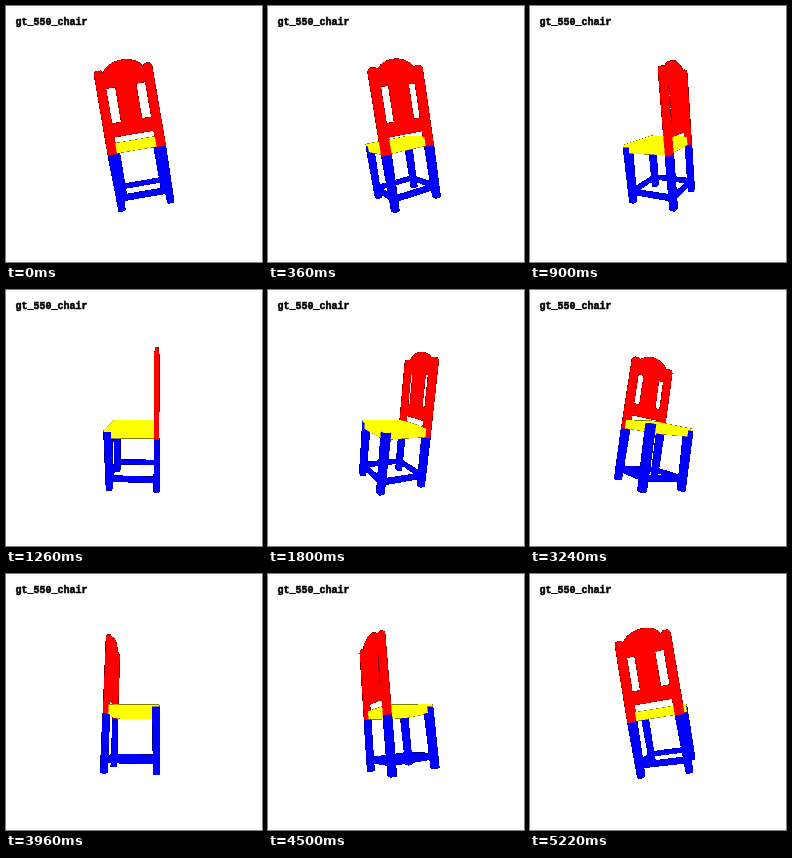
Write an HTML page with a canvas that moves like this. It is 256 by 256 pixels and loops after 5400 ms.

```html
<!DOCTYPE html>
<html lang="en">
<head>
<meta charset="utf-8">
<title>Turning chair</title>
<style>
html, body { margin: 0; width: 100%; height: 100%; overflow: hidden; background: #fff; }
canvas { display: block; width: 256px; height: 256px; image-rendering: pixelated; }
</style>
</head>
<body>
<canvas id="stage" width="256" height="256"></canvas>
<script>
const SIZE = 256, SUB = 2, GRID = SIZE * SUB;
const STEP = 180, STEPS = 30;
const FOV = Math.PI / 3;
const CAMERA = SIZE / 2 / Math.tan(FOV / 2);
const TILT = 0.17;
const RED = 1, YELLOW = 2, BLUE = 3;
const RGB = [[0, 0, 0], [255, 0, 0], [255, 255, 0], [0, 0, 255]];

// Chair measures: x to the side, y up, z towards the back rest.
const FLOOR = -65.8, SEAT_LOW = -14.6, SEAT_TOP = -6.4;
const LEG_X = 22.1, LEG_Z = 22.6;
const SLOT_IN = 9.5, SLOT_OUT = 18, POST_OUT = 26.2;
const RAIL_LOW = 0, RAIL_TOP = 12.6, SLOT_TOP = 44.6, SHOULDER = 58, ARCH = 9.3;

const ctx = document.getElementById("stage").getContext("2d");
const depth = new Float32Array(GRID * GRID);
const paint = new Uint8Array(GRID * GRID);
const solids = [];

// A level rectangle around (x, z) with width w and depth d.
function plate(x, z, w, d, y) {
  return [[-1, -1], [1, -1], [1, 1], [-1, 1]]
    .map(([i, j]) => [x + i * w / 2, y, z + j * d / 2]);
}

function solid(color, low, high) {
  solids.push({ color, corners: [...low, ...high] });
}

function box(color, x, z, w, d, y0, y1) {
  solid(color, plate(x, z, w, d, y0), plate(x, z, w, d, y1));
}

function buildChair() {
  const postX = (SLOT_OUT + POST_OUT) / 2, postW = POST_OUT - SLOT_OUT;
  const legTop = SEAT_TOP - 2.2, joint = SEAT_LOW - 0.4;
  const barLow = -57.3, barTop = -52.3, thick = 3;

  for (const s of [-1, 1]) {
    const foot = z => plate(s * LEG_X, z, 5.8, 5.6, FLOOR);
    solid(BLUE, foot(-LEG_Z), plate(s * 22.4, -21.9, 6.8, 6.8, legTop));
    solid(BLUE, foot(LEG_Z), plate(s * postX, LEG_Z, postW, 4.8, joint));
    box(RED, s * postX, LEG_Z, postW, 4.5, joint, SHOULDER);
    solid(RED, plate(s * postX, LEG_Z, postW, 4.5, SHOULDER),
      plate(s * postX, LEG_Z, postW * 0.65, 4, SHOULDER + 2.6));
    box(BLUE, s * LEG_X, 0, thick, 2 * LEG_Z, barLow, barTop);
    box(BLUE, 0, s * LEG_Z, 2 * LEG_X, thick, barLow, barTop);
  }

  // the seat narrows towards the back
  const seat = y => plate(0, -1, 51, 48.4, y)
    .map(([x, h, z]) => [z > 0 ? x * 0.95 : x, h, z]);
  solid(YELLOW, seat(SEAT_LOW), seat(SEAT_TOP));

  const panel = (w, y0, y1) => box(RED, 0, LEG_Z, w, thick, y0, y1);
  const span = 2 * SLOT_OUT + 0.8;
  panel(span, RAIL_LOW, RAIL_TOP);
  panel(2 * SLOT_IN, RAIL_TOP - 1, SLOT_TOP + 1);

  const parts = 16, w = span / parts;
  const arch = x => SHOULDER + ARCH * Math.pow(Math.max(0, 1 - (2 * x / span) ** 2), 0.65);
  for (let i = 0; i < parts; i++) {
    const x = (i + 0.5) * w - span / 2;
    const low = plate(x, LEG_Z, w, thick, SLOT_TOP);
    solid(RED, low, low.map(([px, , pz]) => [px, arch(px), pz]));
  }
}

// Lean the chair sideways, turn it about the upright axis, then view it in perspective.
function project([x, y, z], angle) {
  const wx = x * Math.cos(TILT) - y * Math.sin(TILT);
  const wy = x * Math.sin(TILT) + y * Math.cos(TILT);
  const c = Math.cos(angle), s = Math.sin(angle);
  const f = CAMERA / (CAMERA - (z * c - wx * s));
  const mid = SIZE / 2;
  return [(mid + f * (wx * c + z * s)) * SUB, (mid - f * wy) * SUB, f];
}

function cross(a, b, x, y) {
  return (a[0] - x) * (b[1] - y) - (a[1] - y) * (b[0] - x);
}

function triangle(a, b, c, color) {
  const area = cross(b, c, a[0], a[1]);
  if (Math.abs(area) < 1e-6) return;
  const low = i => Math.max(0, Math.floor(Math.min(a[i], b[i], c[i])));
  const high = i => Math.min(GRID - 1, Math.ceil(Math.max(a[i], b[i], c[i])));
  const xStart = low(0), xEnd = high(0), yEnd = high(1);
  for (let y = low(1); y <= yEnd; y++) {
    for (let x = xStart; x <= xEnd; x++) {
      const u = cross(b, c, x + 0.5, y + 0.5) / area;
      const v = cross(c, a, x + 0.5, y + 0.5) / area;
      const w = 1 - u - v;
      if (u < 0 || v < 0 || w < 0) continue;
      const near = u * a[2] + v * b[2] + w * c[2];
      const k = y * GRID + x;
      if (near > depth[k]) {
        depth[k] = near;
        paint[k] = color;
      }
    }
  }
}

function quad(a, b, c, d, color) {
  triangle(a, b, c, color);
  triangle(a, c, d, color);
}

function render(angle) {
  depth.fill(0);
  paint.fill(0);
  for (const { color, corners } of solids) {
    const p = corners.map(q => project(q, angle));
    quad(p[0], p[1], p[2], p[3], color);
    quad(p[4], p[5], p[6], p[7], color);
    for (let i = 0; i < 4; i++) {
      const j = (i + 1) % 4;
      quad(p[i], p[j], p[j + 4], p[i + 4], color);
    }
  }
  const image = ctx.createImageData(SIZE, SIZE);
  for (let y = 0; y < SIZE; y++) {
    for (let x = 0; x < SIZE; x++) {
      const k = y * SUB * GRID + x * SUB;
      const hits = [paint[k], paint[k + 1], paint[k + GRID], paint[k + GRID + 1]];
      const filled = hits.filter(Boolean).length >= 2;
      const o = (y * SIZE + x) * 4;
      // partly covered rim pixels fade to black, the rest is white
      for (let i = 0; i < 3; i++) {
        image.data[o + i] = filled ? hits.reduce((sum, h) => sum + RGB[h][i], 0) / 4 : 255;
      }
      image.data[o + 3] = 255;
    }
  }
  return image;
}

function label(text, x, y) {
  ctx.font = 'bold 10px "Liberation Mono", monospace';
  ctx.lineWidth = 0.5;
  ctx.fillText(text, x, y);
  ctx.strokeText(text, x, y);
}

const cache = [];
let shown = -1;

function draw(step) {
  cache[step] = cache[step] || render(step / STEPS * 2 * Math.PI);
  ctx.putImageData(cache[step], 0, 0);
  label("gt_550_chair", 9.5, 19);
  shown = step;
}

buildChair();
draw(0);
const start = performance.now();

function tick() {
  const step = Math.floor((performance.now() - start) / STEP) % STEPS;
  if (step !== shown) draw(step);
  requestAnimationFrame(tick);
}
requestAnimationFrame(tick);
</script>
</body>
</html>
```
